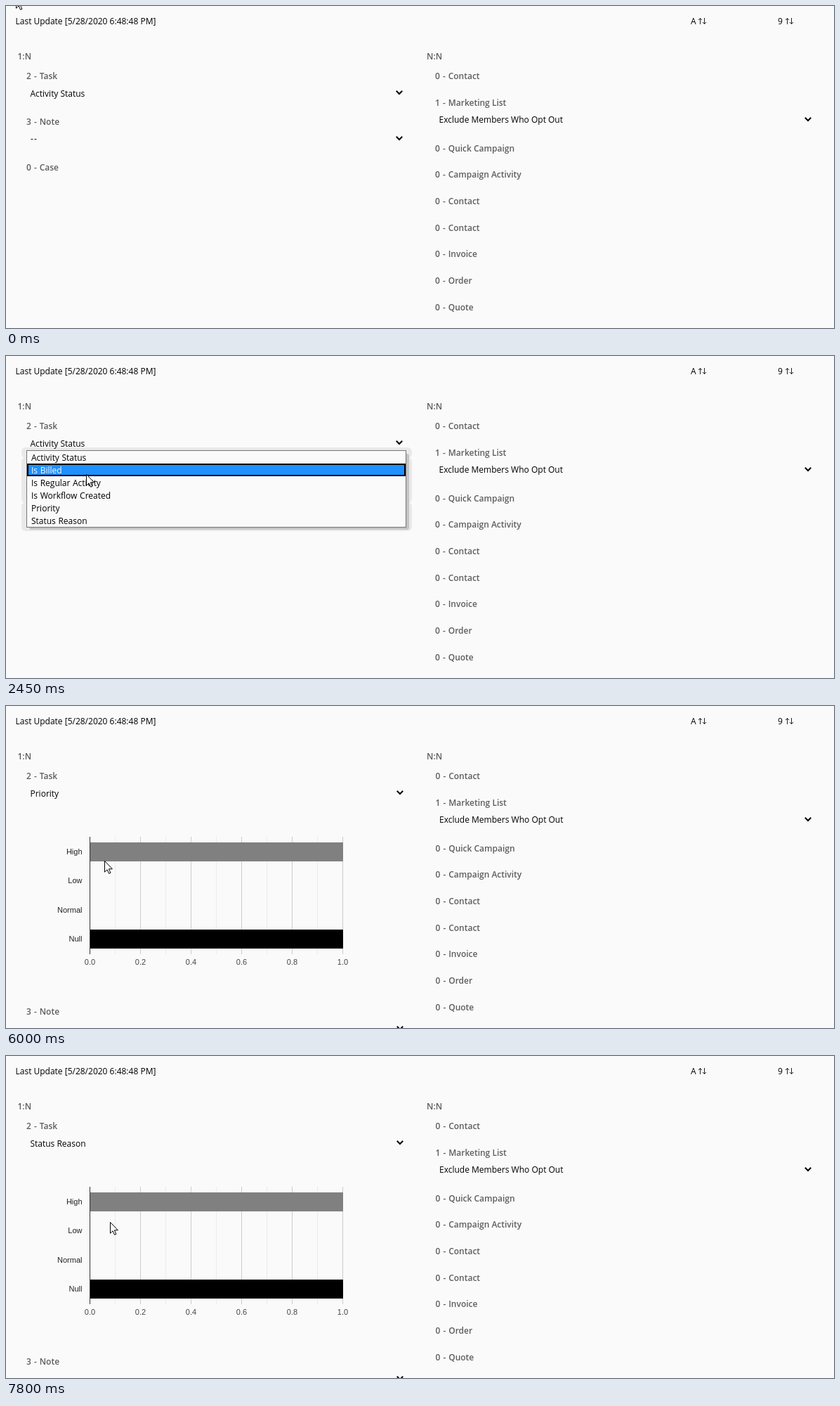
An HTML page for the animation above (8000 ms loop, 1179x458 px).

```html
<!DOCTYPE html>
<html lang="en">
<head>
<meta charset="utf-8">
<title>Related records</title>
<style>
html, body { margin: 0; width: 100%; height: 100%; overflow: hidden; background: #fafafa; }
svg { display: block; width: 1179px; height: 458px; font: 12px "Open Sans", "Noto Sans", sans-serif; font-variant-ligatures: none; }
.label { font-weight: 600; fill: #605e5c; }
.list { word-spacing: 0.5px; }
.chart { font: 11px "Liberation Sans", Arial, sans-serif; fill: #222; }
.tip { font-weight: bold; fill: #000; }
.chevron { fill: none; stroke: #000; stroke-width: 2; }
.arrow { fill: none; stroke: #222; stroke-width: 1; }
</style>
</head>
<body>
<svg id="stage" viewBox="0 0 1179 458"></svg>
<script>
const LOOP = 8000, STEP = 50;
const OPTIONS = ["Activity Status", "Is Billed", "Is Regular Activity", "Is Workflow Created", "Priority", "Status Reason"];
const stage = document.getElementById("stage");

function add(parent, tag, attrs, content) {
  const el = document.createElementNS("http://www.w3.org/2000/svg", tag);
  for (const k in attrs) el.setAttribute(k, attrs[k]);
  if (content) el.textContent = content;
  parent.appendChild(el);
  return el;
}
const group = (parent, cls = "") => add(parent, "g", { class: cls });
const text = (parent, x, y, content, cls = "") => add(parent, "text", { x, y, class: cls }, content);
const rect = (parent, x, y, width, height, fill, more) => add(parent, "rect", { x, y, width, height, fill, ...more });
const path = (parent, d, more) => add(parent, "path", { d, ...more });
const chevron = (parent, x, y) => path(parent, `M${x - 4.2} ${y - 2.2}l4.2 4.2 4.2 -4.2`, { class: "chevron" });
const show = (el, on) => el.setAttribute("display", on ? "inline" : "none");
const move = (el, x, y) => el.setAttribute("transform", `translate(${x} ${y})`);

// A count, a dash and a name, each in its own column
function entry(parent, x, y, count, name) {
  text(parent, x, y, String(count), "label");
  text(parent, x + 11, y, "-", "label");
  text(parent, x + 18.7, y, name, "label");
}

// Header
text(stage, 13.5, 26, "Last Update [5/28/2020 6:48:48 PM]");
for (const [x, name] of [[975, "A"], [1099, "9"]]) {
  text(stage, x, 26, name);
  path(stage, `M${x + 13.5} 26v-8.5m-2.5 2.5l2.5 -2.5 2.5 2.5M${x + 19.5} 17v8.5m-2.5 -2.5l2.5 2.5 2.5 -2.5`, { class: "arrow" });
}

// Left column
text(stage, 16.5, 76, "1:N", "label");
entry(stage, 29, 104, 2, "Task");
const rest = group(stage);
entry(rest, 29, 169, 3, "Note");
text(rest, 35, 193, "-");
text(rest, 40, 193, "-");
entry(rest, 29, 234, 0, "Case");
const restChevron = chevron(rest, 560, 188);

// Right column
text(stage, 599, 76, "N:N", "label");
const right = group(stage);
["Contact", "Marketing List", "Quick Campaign", "Campaign Activity", "Contact", "Contact", "Invoice", "Order", "Quote"]
  .forEach((name, i) => {
    const y = i < 2 ? 104 + i * 38 : Math.round(206.6 + (i - 2) * 37.7);
    entry(right, 611, y, i === 1 ? 1 : 0, name);
  });
text(right, 616.5, 166, "Exclude Members Who Opt Out");
chevron(stage, 1142, 161);

// Bar chart
const chart = group(stage, "chart");
for (let i = 1; i <= 10; i++) {
  rect(chart, 119 + i * 36, 186, 1, 167, i % 2 ? "#ebebeb" : "#ccc");
}
for (let i = 0; i <= 5; i++) {
  add(chart, "text", { x: 119.5 + i * 72, y: 368, "text-anchor": "middle", fill: "#444" }, (i / 5).toFixed(1));
}
["High", "Low", "Normal", "Null"].forEach((name, i) =>
  add(chart, "text", { x: 108.5, y: Math.round(211 + i * 41.4), "text-anchor": "end" }, name));

function bar(name, y, fill, tipWidth) {
  rect(chart, 120, y, 360, 27, fill);
  const tip = group(chart, "tip");
  rect(tip, 119.5, y - 0.5, 360, 28, "none", { stroke: "#999" });
  rect(tip, 119.5, y - 1.5, 361, 30, "none", { stroke: "#ddd" });
  const top = y - 48.5, end = 471.5 + tipWidth;
  path(tip, `M471.5 ${top}H${end}V${top + 39}H${end - 8}L480 ${y}L490 ${top + 39}H471.5Z`,
    { fill: "#fff", stroke: "#ccc", "stroke-linejoin": "round" });
  text(tip, 477, y - 34, name);
  text(tip, 477, y - 19, "1");
  return tip;
}
rect(chart, 119, 186, 1, 167, "#333");
const highTip = bar("High", 194, "#808080", 38);
const nullTip = bar("Null", 318, "#000", 35);

// Option list
const list = group(stage, "list");
const shadow = (parent, y, end) => rect(parent, 22, y, 556, end - y, "#e9e9e9", { rx: 6 });
const splitShadow = group(list), fullShadow = group(list);
shadow(splitShadow, 130, 145);
shadow(splitShadow, 144, 209);
shadow(splitShadow, 208, 249);
shadow(fullShadow, 130, 249);
rect(list, 33, 139, 541, 108, "#c4c4c4", { rx: 3 });
rect(list, 29.5, 134.5, 540, 109, "#fafafa", { stroke: "#767676" });
const mark = rect(list, 31, 136, 537, 16, "#1e90ff", { stroke: "#000", "stroke-width": 2 });
const items = OPTIONS.map((name, i) => text(list, 36, 149 + i * 18, name));

// Select box and pointer
const value = text(stage, 34.5, 129, OPTIONS[0]);
const taskChevron = chevron(stage, 560, 123);
const pointer = path(stage, "M.5 .5V16.2L4.1 12.8L6.6 18.3L8.9 17.3L6.4 11.8H11.4Z",
  { fill: "#fff", stroke: "#000", "stroke-linejoin": "round" });

const linear = u => u, ease = u => u * u * (3 - 2 * u);
const speedUp = u => u * u, slowDown = u => u * (2 - u);
// time, x, y, easing on the way there
const TRACK = [
  [0, 14, -13], [850, 14, -13],
  [1450, 120, 123, ease], [1950, 120, 123],
  [2250, 115, 146, slowDown], [2750, 112, 209, ease], [2850, 112, 209],
  [2950, 112, 214], [3800, 112, 214],
  [3950, 122, 218], [4150, 143, 216, slowDown], [4400, 143, 216],
  [4450, 144, 216], [4550, 144, 216],
  [5000, 161, 328, ease], [5450, 161, 328], [5500, 161, 329], [5750, 161, 329],
  [6000, 140, 220, speedUp], [6300, 147, 127, slowDown], [6650, 147, 127],
  [6750, 151, 148], [7150, 152, 240, ease], [7300, 152, 240],
  [7500, 148, 236, ease], [LOOP, 148, 236]
];

function pointerAt(t) {
  const i = TRACK.findIndex(k => k[0] > t);
  const [t0, x0, y0] = TRACK[i - 1], [t1, x1, y1, fn = linear] = TRACK[i];
  const u = fn((t - t0) / (t1 - t0));
  return [Math.round(x0 + (x1 - x0) * u), Math.round(y0 + (y1 - y0) * u)];
}

function draw(now) {
  const t = Math.floor((now % LOOP) / STEP) * STEP;
  const [x, y] = pointerAt(t);
  const charted = t >= 3550;
  const open = (t >= 1650 && t < 3200) || (t >= 6450 && t < 7800);
  const picked = t < 3150 ? 0 : t < 7800 ? 4 : 5;

  move(pointer, x, y);
  value.textContent = OPTIONS[picked];
  show(chart, charted);
  move(rest, 0, charted ? 270 : 0);
  move(right, charted ? 0.5 : 0, 0);
  move(taskChevron, charted ? 1 : 0, 0);
  move(restChevron, charted ? 1 : 0, 0);

  const onBars = charted && !open && x >= 120 && x < 480;
  show(highTip, onBars && y >= 194 && y < 220);
  show(nullTip, onBars && y >= 318 && y < 345);

  show(list, open);
  show(splitShadow, !charted);
  show(fullShadow, charted);
  const row = y < 135 ? picked : Math.min(5, Math.floor((y - 135) / 18));
  move(mark, 0, row * 18);
  items.forEach((el, i) => el.setAttribute("fill", i === row ? "#fff" : "#000"));
}

function frame() {
  draw(performance.now());
  requestAnimationFrame(frame);
}
frame();
</script>
</body>
</html>
```
